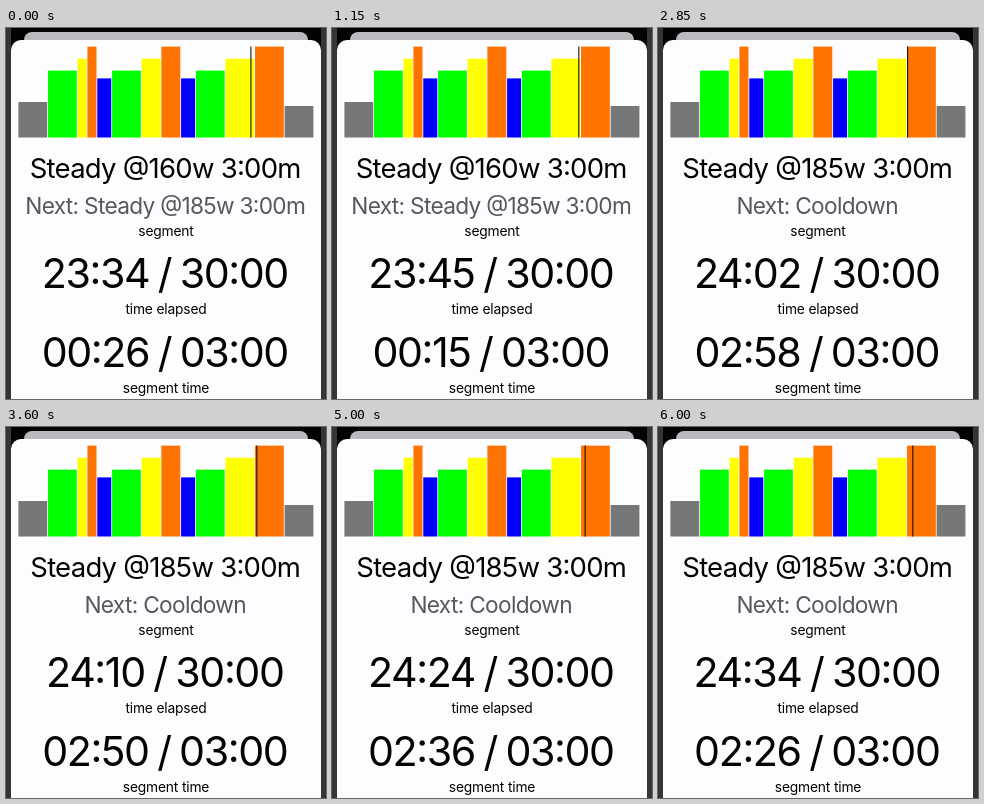
An HTML page that plays this animation: 320x371 px, repeating every 6.1 s.

```html
<!DOCTYPE html>
<html lang="en">
<head>
<meta charset="utf-8">
<title>Workout timer</title>
<style>
  html, body { margin: 0; width: 100%; height: 100%; overflow: hidden; background: #353537; }
  svg { display: block; width: 320px; height: 371px; }
  text {
    font-family: Inter, "Liberation Sans", sans-serif;
    font-feature-settings: "calt" 1;
    text-anchor: middle;
    fill: #030303;
  }
  .title { font-size: 27.5px; letter-spacing: -.027em; }
  .next { font-size: 22.7px; letter-spacing: -.031em; fill: #58585c; }
  .clock { font-size: 41.2px; letter-spacing: -.034em; word-spacing: -.04em; font-feature-settings: "case" 1; }
  .label { font-size: 13.8px; letter-spacing: -.012em; }
</style>
</head>
<body>
<svg viewBox="0 0 320 371">
  <rect width="320" height="371" fill="#353537"/>
  <rect x="5" width="310" height="24" fill="#030304"/>
  <path d="M18 14V12a8 8 0 0 1 8-8H294a8 8 0 0 1 8 8V14Z" fill="#bbb8be"/>
  <path d="M5 371V22a10 10 0 0 1 10-10H305a10 10 0 0 1 10 10V371Z" fill="#fdfcfe"/>
  <g id="bars"></g>
  <rect id="marker" y="18.5" width="1.1" height="91" fill="#141400"/>
  <text id="title" class="title" x="159.2" y="150"></text>
  <text id="next" class="next" x="159.2" y="185.5"></text>
  <text class="label" x="160" y="207.5">segment</text>
  <text id="elapsed" class="clock" x="158.8" y="260"></text>
  <text class="label" x="160" y="286">time elapsed</text>
  <text id="left" class="clock" x="158.8" y="338.5"></text>
  <text class="label" x="160" y="364.5">segment time</text>
</svg>
<script>
const LOOP = 6100, START = 23 * 60 + 34, SWITCH = 24 * 60;
const CHART = { x: 11.6, bottom: 109.5, minute: 9.86, gap: .8 };
const GRAY = '#777', GREEN = '#0f0', YELLOW = '#ff0', ORANGE = '#ff7300', BLUE = '#00f';

// minutes, top edge, colour
const segments = [
  [3, 74, GRAY], [3, 42.6, GREEN], [1, 30.7, YELLOW], [1, 18.6, ORANGE], [1.5, 50.4, BLUE],
  [3, 42.6, GREEN], [2, 30.7, YELLOW], [2, 18.6, ORANGE], [1.5, 50.4, BLUE],
  [3, 42.6, GREEN], [3, 30.7, YELLOW], [3, 18.6, ORANGE], [3, 78, GRAY]
];

const el = id => document.getElementById(id);
const pad = n => String(n).padStart(2, '0');
const mmss = s => pad(Math.floor(s / 60)) + ':' + pad(s % 60);

function setText(id, value) {
  if (el(id).textContent !== value) el(id).textContent = value;
}

function drawBars() {
  let x = CHART.x;
  for (const [minutes, y, fill] of segments) {
    const width = minutes * CHART.minute;
    const bar = document.createElementNS('http://www.w3.org/2000/svg', 'rect');
    const attrs = { x: x + CHART.gap, y, width: width - CHART.gap, height: CHART.bottom - y, fill };
    for (const key in attrs) bar.setAttribute(key, attrs[key]);
    el('bars').append(bar);
    x += width;
  }
}

function render(t) {
  const tick = Math.floor(t / 50) * 50;
  // the display stalls briefly while the segment changes over
  const shown = tick >= 2700 && tick < 2850 ? 2700 : tick;
  const now = START + Math.floor(shown / 100);
  const second = tick >= 2850;
  const left = second ? SWITCH + 180 - now : Math.max(0, SWITCH - now);

  setText('title', `Steady @${second ? 185 : 160}w 3:00m`);
  setText('next', now >= SWITCH ? 'Next: Cooldown' : 'Next: Steady @185w 3:00m');
  setText('elapsed', mmss(now) + ' / 30:00');
  setText('left', mmss(left) + ' / 03:00');
  el('marker').setAttribute('x', CHART.x + (START + shown / 100) / 60 * CHART.minute + .4);
}

function frame() {
  render(performance.now() % LOOP);
  requestAnimationFrame(frame);
}

drawBars();
frame();
</script>
</body>
</html>
```
